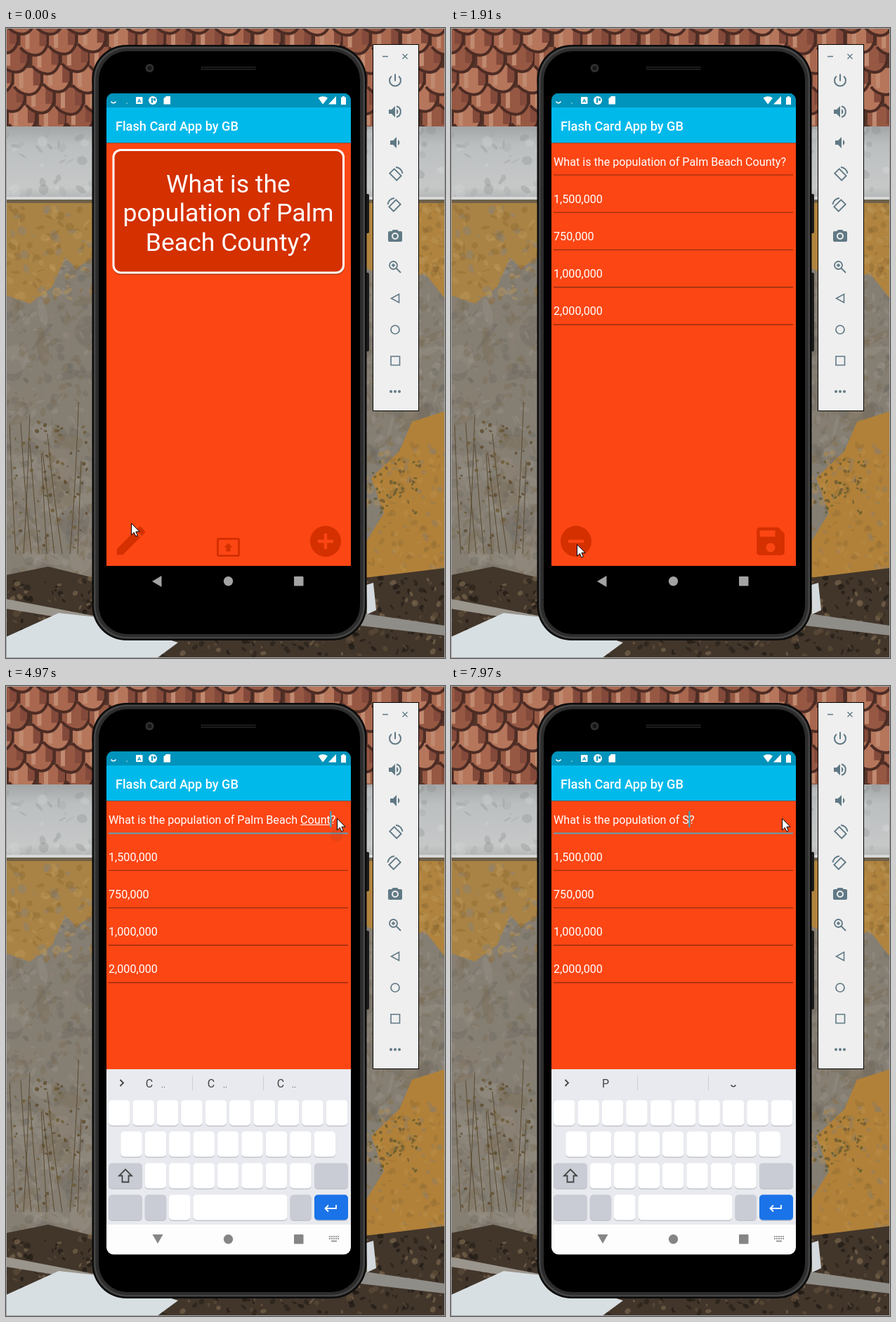
Write an HTML page with a canvas that moves like this. It is 625 px wide and 896 px high and loops after 8 s.

```html
<!DOCTYPE html>
<html lang="en">
<head>
<meta charset="utf-8">
<title>Flash card editor</title>
<style>
html, body { margin: 0; width: 100%; height: 100%; overflow: hidden; }
canvas { display: block; width: 625px; height: 896px; }
</style>
</head>
<body>
<canvas id="stage" width="625" height="896"></canvas>
<script>
const W = 625, H = 896, LOOP = 8000;
const ORANGE = '#fc4614', RED = '#d43000', CYAN = '#00b9eb', SLATE = '#607985';
let g = document.getElementById('stage').getContext('2d');

// ---------- helpers ----------
function box(x, y, w, h, color, r = 0) {
  g.fillStyle = color;
  g.beginPath();
  g.roundRect(x, y, w, h, r);
  g.fill();
}
function disc(x, y, r, color) {
  g.fillStyle = color;
  g.beginPath();
  g.arc(x, y, r, 0, 7);
  g.fill();
}
function shape(d, color, x = 0, y = 0, scale = 1, line = 0) {
  g.save();
  g.translate(x, y);
  g.scale(scale, scale);
  const path = new Path2D(d);
  g.fillStyle = g.strokeStyle = color;
  g.lineWidth = line;
  if (line) g.stroke(path); else g.fill(path, 'evenodd');
  g.restore();
}
function text(s, x, y, size, color = '#fff', weight = 400, align = 'left') {
  g.font = `${weight} ${size}px Roboto, sans-serif`;
  g.textAlign = align;
  g.fillStyle = color;
  g.fillText(s, x, y);
}
const smile = (x, y, color) => shape('M-3.5 -1.5Q0 3 3.5 -1.5', color, x, y, 1, 1.5);
function layer(draw) {
  const canvas = document.createElement('canvas'), outer = g;
  canvas.width = W;
  canvas.height = H;
  g = canvas.getContext('2d');
  draw();
  g = outer;
  return canvas;
}
function scaled(s, draw) {
  g.save();
  g.translate(317, 450);
  g.scale(s, s);
  g.translate(-317, -450);
  draw();
  g.restore();
}
function tween(keys, t) {
  const i = keys.findIndex(k => k[0] > t);
  if (i < 1) return i ? keys.at(-1) : keys[0];
  const a = keys[i - 1], b = keys[i], f = (t - a[0]) / (b[0] - a[0]);
  return a.map((v, j) => v + (b[j] - v) * f);
}
const latest = (list, t) => list.findLast(e => e[0] <= t + 1);
let seed = 7;
const rnd = (a = 1, b = 0) => {
  seed = (seed * 16807) % 2147483647;
  return b + (a - b) * seed / 2147483647;
};

// ---------- scenery ----------
function blotches(n, x0, y0, x1, y1, size, tones, alpha) {
  g.globalAlpha = alpha;
  for (let i = 0; i < n; i++) {
    g.fillStyle = tones[Math.floor(rnd(tones.length))];
    g.beginPath();
    g.ellipse(rnd(x1, x0), rnd(y1, y0), rnd(size, 1), rnd(size, 1), rnd(3), 0, 7);
    g.fill();
  }
  g.globalAlpha = 1;
}
function scenery() {
  box(0, 0, W, H, '#857e73');
  // plaster wall
  const tones = ['#6a665e', '#9a958b', '#77694f', '#8d8274'];
  blotches(60, 0, 380, 125, 770, 24, tones, .35);
  blotches(400, 0, 340, 125, 785, 7, tones, .35);
  blotches(40, 510, 350, 625, 620, 24, tones, .35);
  blotches(300, 510, 350, 625, 620, 7, tones, .35);
  shape('M0 248H125V325L100 342 84 326 66 368 34 392 0 380z', '#a98345');
  shape('M510 248H625V385L596 348 560 365 510 340z', '#b0843f');
  shape('M510 735L538 690 520 640 560 602 578 560 625 545V790H510z', '#b18139');
  blotches(110, 0, 250, 125, 390, 7, ['#8d6a34', '#bb9758', '#888078'], .45);
  blotches(60, 590, 250, 625, 360, 6, ['#8d6a34', '#bb9758'], .4);
  blotches(140, 510, 590, 625, 785, 6, ['#8d6a34', '#bd934d', '#847c72'], .35);
  for (let i = 0; i < 9; i++) {
    const x = 14 + i * 11, lean = rnd(14, -14);
    shape(`M${x} 748Q${x + lean} 660 ${x + lean * 1.6} ${rnd(620, 530)}`, '#5b4b31', 0, 0, 1, 1);
  }
  blotches(70, 10, 560, 115, 745, 3, ['#5c4a2c', '#6d5a34'], .8);
  blotches(50, 518, 610, 590, 690, 3, ['#5c5a2c', '#6d5a34'], .8);
  // roof tiles
  box(0, 0, W, 142, '#54342a');
  for (let row = 5; row >= 0; row--)
    for (let col = -4; col < 16; col++) {
      const x = col * 42 + row * 17 + rnd(4), y = row * 28 - 32 + rnd(5);
      shape('M0 0V27Q8 36 20 37 33 38 39 22V0z', ['#a8674e', '#965843', '#b5765b'][Math.floor(rnd(3))], x, y);
      shape('M32 0V25', '#83493a', x, y, 1, 10);
      shape('M10 0V29', '#c08a70', x, y, 1, 6);
      shape('M0 27Q8 37 20 38 33 39 39 22V4', '#4d2c24', x, y, 1, 4);
    }
  // ledge
  const ledge = g.createLinearGradient(0, 140, 0, 248);
  ledge.addColorStop(0, '#a3a6a7');
  ledge.addColorStop(.25, '#bcbfc0');
  ledge.addColorStop(.8, '#c6c8c8');
  ledge.addColorStop(1, '#adafae');
  g.fillStyle = ledge;
  g.fillRect(0, 140, W, 104);
  blotches(160, 0, 142, W, 240, 8, ['#8e9191', '#d5d7d8', '#a6a9a8'], .35);
  box(0, 240, W, 4, '#d6d8d8');
  box(0, 244, W, 5, '#6f6049');
  // ground
  shape('M0 778L60 766 125 782H510L560 776 625 768V896H0z', '#42362b');
  blotches(500, 0, 782, W, 892, 5, ['#2a221b', '#5c4a38', '#78644c', '#1f1a16'], .7);
  shape('M0 812L125 836V846L0 826z', '#9a958d');
  shape('M0 866L75 832 130 838 245 874 215 896H0z', '#d8dfe3');
  shape('M505 832L625 850V864L505 850z', '#8f8d88');
  shape('M513 792L523 789 527 828 514 834z', '#d3d9dd');
  g.strokeStyle = '#a5a5a5';
  g.strokeRect(.5, .5, W - 1, H - 1);
}
function phone() {
  box(512, 236, 5, 56, '#1b1b1b', 2);
  box(512, 348, 5, 112, '#1b1b1b', 2);
  box(122.5, 24, 391, 847, '#0b0b0b', 49);
  box(125, 26.500, 386, 842, '#454545', 47);
  box(127.5, 29, 381, 837, '#2c2c2c', 45);
  box(132, 33, 372, 829, '#000', 41);
  disc(204.5, 57, 6, '#303030');
  disc(204.5, 57, 3, '#161616');
  for (let i = 0; i < 78; i++) box(278 + i % 39 * 2, 55 + (i > 38 ? 3 : 0), 1, 1.5, '#484848');
}
function toolbar() {
  box(522, 23, 66, 522, '#000');
  box(523, 24, 64, 520, '#efefef');
  const put = (d, y, line) => shape(d, SLATE, 542, y - 12, 1, line);
  put('M-6 12.5h8M22.5 9l7 7M29.5 9l-7 7', 40, 1.3);
  put('M12 3v10M6.9 5.9a8 8 0 1 0 10.2 0', 74.5, 2);
  const speaker = 'M3 9v6h4l5 5V4L7 9zM14 8v8a4.5 4.5 0 0 0 0-8z';
  put(speaker, 119);
  put('M14 4.3a8 8 0 0 1 0 15.4', 119, 2);
  shape(speaker, SLATE, 544, 151);
  const rotate = 'M10.7 4.3L4.3 10.7l9.9 9.9 6.4-6.4zM13 2a10 10 0 0 1 9.5 9';
  put(rotate, 208, 1.9);
  g.save();
  g.translate(1108, 0);
  g.scale(-1, 1);
  put(rotate, 252, 1.9);
  g.restore();
  put('M9 3L7 5H4a2 2 0 0 0-2 2v11a2 2 0 0 0 2 2h16a2 2 0 0 0 2-2V7a2 2 0 0 0-2-2h-3l-2-2zM12 7a5 5 0 1 0 0 10 5 5 0 0 0 0-10z', 296);
  disc(554, 296, 3, SLATE);
  put('M15 9.5a5.5 5.5 0 1 0-11 0 5.5 5.5 0 0 0 11 0zM13.5 13.5l6.5 6.5M9.5 7v5M7 9.5h5', 340, 1.8);
  put('M17.5 6v12L6.5 12z', 384.5, 1.6);
  put('M18 12a6 6 0 1 0-12 0 6 6 0 0 0 12 0z', 429, 1.7);
  put('M6 6h12.5v12.5h-12.5z', 473, 1.6);
  for (const x of [548, 554, 560]) disc(x, 517, 2, SLATE);
}

// ---------- app ----------
const CIRCLE = 'M12 2a10 10 0 1 0 0 20 10 10 0 0 0 0-20z';
function frameApp() {
  box(143, 93, 348, 20, '#0093bb');
  box(143, 113, 348, 50.5, CYAN);
  box(143, 163.5, 348, 602, ORANGE);
  box(143, 765, 348, 60, '#000');
  text('Flash Card App by GB', 156, 145.7, 18.15, '#fff', 500);
}
function home() {
  frameApp();
  box(152, 174, 330, 177, '#b83208', 12);
  box(151.5, 172, 330.5, 177.5, '#fff', 12);
  box(154.5, 175, 324.5, 171.5, RED, 9);
  ['What is the', 'population of Palm', 'Beach County?'].forEach((s, i) =>
    text(s, 316.5, 233.5 + i * 41.7, 35.6, '#fff', 400, 'center'));
  shape('M3 17.2V21h3.8L17.8 9.9l-3.7-3.7zM20.7 7a1 1 0 0 0 0-1.4l-2.3-2.3a1 1 0 0 0-1.4 0l-1.9 1.8 3.8 3.8z', RED, 151.3, 702.5, 2.23);
  shape('M3 3a2 2 0 0 0-2 2v14a2 2 0 0 0 2 2h18a2 2 0 0 0 2-2V5a2 2 0 0 0-2-2zM3 5h18v14H3zM10 12H8l4-4 4 4h-2v4h-4z', RED, 298.5, 720.5, 1.5);
  shape(CIRCLE + 'M17 13h-4v4h-2v-4H7v-2h4V7h2v4h4z', RED, 428.6, 703.6, 2.2);
}
const LEAD = 'What is the population of ';
const words = [[0, 'Palm Beach County'], [4970, 'Palm Beach Count'], [5110, 'Palm Beach Coun'],
  [5390, 'Palm Beach Cou'], [5670, 'Palm Beach Co'], [5950, 'Palm Beach C'], [6090, 'Palm Beach'],
  [6230, 'Palm Bea'], [6380, 'Palm B'], [6520, 'Palm'], [6670, 'Pal'], [6815, 'Pa'], [6960, 'P'],
  [7110, ''], [7970, 'S']];
function edit(t) {
  frameApp();
  const word = latest(words, t)[1], focus = t >= 3880, y0 = 195.5;
  [LEAD + word + '?', '1,500,000', '750,000', '1,000,000', '2,000,000'].forEach((s, i) => {
    const y = y0 + i * 53.2;
    text(s, 146, y, 16.15);
    if (focus && !i) box(146, 208.5, 341, 2, '#5c9fb4');
    else box(146, y + 13, 341, 1.1, '#84290f');
  });
  shape(CIRCLE + 'M17 13H7v-2h10z', RED, 151.6, 703.6, 2.2);
  shape('M17 3H5a2 2 0 0 0-2 2v14a2 2 0 0 0 2 2h14a2 2 0 0 0 2-2V7zM12 13a3 3 0 1 0 0 6 3 3 0 0 0 0-6zM15 9H5V5h10z', RED, 428.6, 703.6, 2.2);
  if (!focus) return;
  g.font = '400 16.15px Roboto, sans-serif';
  const width = s => g.measureText(s).width;
  const end = 146 + width(LEAD + word), last = word.split(' ').pop();
  if (t > 4150 && word !== 'S') box(end - width(last), 197, width(last), 1, '#fff');
  if (t < 7690 || t >= 7970) box(end - .5, 178, 2, 23, '#2fadcf');
  if (t < 4970) {
    disc(470.5, 212, 9, CYAN);
    shape('M470.5 202l6 5h-12z', CYAN);
  } else if (t < 5110) disc(470.5, 212, 9, 'rgba(90,60,50,.12)');
}
function statusIcons() {
  smile(153, 106, '#fff');
  disc(172, 107, .7, '#fff');
  box(185, 98, 9.5, 10, '#fff', 1);
  text('A', 189.8, 106, 8, '#0093bb', 700, 'center');
  disc(209, 103, 6, '#fff');
  box(207, 99.5, 2, 7, '#0093bb');
  box(210, 100, 3, 3.5, '#0093bb');
  shape('M228 97h6v11.5h-9.5V100.5z', '#fff');
  shape('M444.5 99.5Q451 95 458 99.5L451.2 108.5z', '#fff');
  shape('M470 97v11.5h-11z', '#fff');
  shape('M479 97h3v1.5h2v10.5h-7V98.5h2z', '#fff');
}

// ---------- keyboard ----------
function keyboard() {
  const GREY = '#c9ccd4';
  const key = (x, y, w, color = '#fff') => {
    box(x, y + 1.5, w, 36, '#c3c5cc', 5);
    box(x, y, w, 36, color, 5);
  };
  const row = (n, x, y) => { for (let i = 0; i < n; i++) key(x + i * 34.4, y, 30.5); };
  box(143, 545, 348, 221, '#e8eaef');
  box(143, 766, 348, 43, '#fdfdfd');
  row(10, 146, 589);
  row(9, 163.3, 633.5);
  row(7, 197.7, 678.5);
  key(146, 678.5, 48, GREY);
  key(439, 678.5, 48, GREY);
  key(146, 723.5, 48, GREY);
  key(197.7, 723.5, 30.5, GREY);
  key(232, 723.5, 30.5);
  key(266.5, 723.5, 134);
  key(404.5, 723.5, 30.5, GREY);
  key(439, 723.5, 48, '#1a73e8');
  shape('M170 687.5l9 9h-4.5v9h-9v-9h-4.5z', '#444', 0, 0, 1, 1.8);
  shape('M470 738v5h-15M459 738.5l-4.5 4.5 4.5 4.5', '#fff', 0, 0, 1, 1.8);
  shape('M162.5 560l4.5 4.5-4.5 4.5', '#444', 0, 0, 1, 1.8);
  box(265, 554, 1, 21, '#cdcfd5');
  box(366, 554, 1, 21, '#cdcfd5');
}
const hints = [
  [0, 'C', 200, '..', 221, 'C', 292, '..', 312, 'C', 385, '..', 405, "'", 432],
  [4970, 'C', 204, '..', 224, 'C', 292, '..', 312, 'C', 391, '..', 410],
  [6230, 'B', 203, 'c', 229, 'B', 403],
  [7110, 'P', 220]];
function hintBar(t) {
  const list = latest(hints, t);
  for (let i = 1; i < list.length; i += 2)
    text(list[i], list[i + 1], 570.5, list[i] === '..' ? 11 : 16, '#444', 400, 'center');
  if (t >= 7970) smile(402, 569, '#444');
}
function navBar(alpha) {
  const color = alpha > .9 ? '#858585' : '#a3a3a3';
  shape(alpha > .9 ? 'M208.5 780h15L216 793z' : 'M208 787l13.5-8v16z', color);
  disc(316.5, 786.8, 6.7, color);
  box(410, 780, 13.5, 13.5, color, 1);
  if (!alpha) return;
  for (let i = 0; i < 10; i++) box(460 + i % 5 * 3, 782 + (i > 4 ? 3 : 0), 2, 2, '#999');
  box(463, 788.5, 8, 2, '#999');
}

// ---------- timeline ----------
const steps = [0];
for (const [a, b, n] of [[150, 410, 3], [810, 810, 1], [1650, 1910, 3], [2370, 2490, 2], [2770, 3760, 8],
  [3880, 4690, 7], [4970, 5950, 8], [6090, 7110, 8], [7230, 7230, 1], [7690, 7690, 1], [7970, 7970, 1]])
  for (let i = 0; i < n; i++) steps.push(a + (n > 1 ? (b - a) * i / (n - 1) : 0));

const pointer = [[0, 178, 704], [150, 176, 716], [280, 178, 726], [410, 179, 731], [810, 179, 734],
  [1910, 179, 734], [2370, 255, 540], [2490, 340, 312], [2770, 352, 288], [3053, 440, 145],
  [3340, 493, 188], [3477, 488, 190], [3760, 471, 188]];
const rise = [[4150, 0], [4285, .47], [4420, .93], [4555, 1]];
const zoomIn = [[1650, .98], [1780, .997], [1910, 1]];

const backdrop = layer(() => { scenery(); phone(); toolbar(); });
const keys = layer(keyboard);

function render(time) {
  const t = steps.findLast(s => s <= time + .5);
  g.drawImage(backdrop, 0, 0);
  g.save();
  g.beginPath();
  g.roundRect(143, 92.5, 348, 716, 10);
  g.clip();
  if (t < 1650) home();
  else {
    if (t < 1910) {
      scaled(1.044, home);
      box(143, 92, 348, 717, 'rgba(0,0,0,.13)');
      box(143, 779, 348, 30, '#000');
    }
    scaled(tween(zoomIn, t)[1], () => edit(t));
  }
  statusIcons();
  const alpha = tween(rise, t)[1];
  if (alpha) {
    g.save();
    g.globalAlpha = alpha;
    g.translate(0, (1 - alpha) * 210);
    g.drawImage(keys, 0, 0);
    hintBar(t);
    g.restore();
  }
  navBar(alpha);
  g.restore();
  const [, x, y] = tween(pointer, t), arrow = 'M.5 .5V17L4.3 13.4 6.8 19 9.3 18 6.9 12.3H12z';
  shape(arrow, '#fff', x, y);
  shape(arrow, '#000', x, y, 1, 1);
}
function tick() {
  render(performance.now() % LOOP);
  requestAnimationFrame(tick);
}
tick();
</script>
</body>
</html>
```
